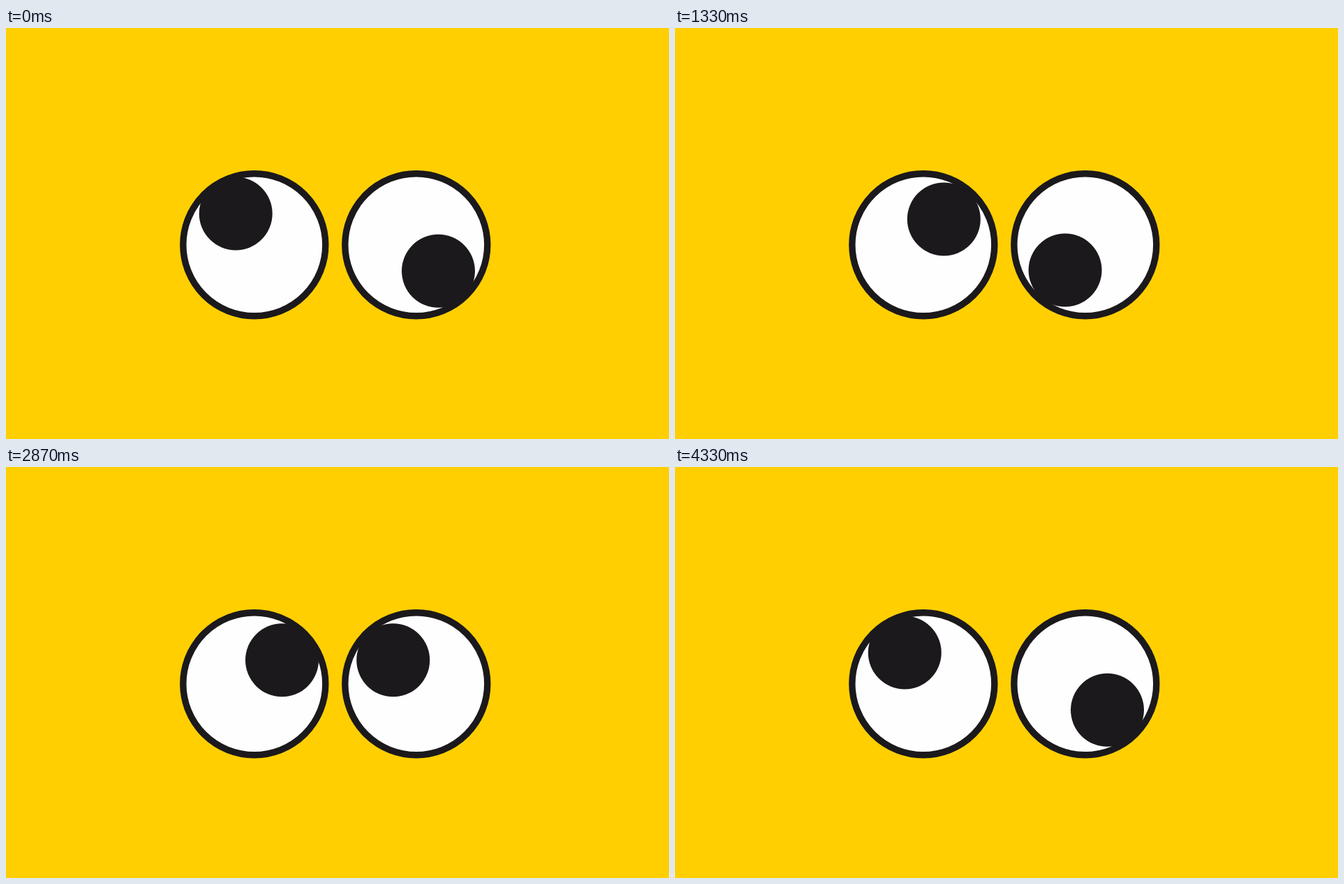
Write an HTML page that moves like this. It is 950 px wide and 589 px high and loops after 4400 ms.

```html
<!DOCTYPE html>
<html lang="en">
<head>
<meta charset="utf-8">
<title>Googly eyes</title>
<style>
  html, body { margin: 0; width: 100%; height: 100%; overflow: hidden; background: #ffcf02; }
  svg { display: block; width: 950px; height: 589px; }
  .eye { fill: #fefefe; stroke: #1b191c; stroke-width: 9.4; }
  .pupil { fill: #1b191c; }
</style>
</head>
<body>
<svg viewBox="0 0 950 589">
  <circle class="eye" cx="355.8" cy="310.8" r="102"/>
  <circle class="eye" cx="587.8" cy="310.8" r="102"/>
  <circle class="pupil" r="52.5"/>
  <circle class="pupil" r="52.5"/>
</svg>
<script>
  const LOOP = 4400, FRAME = 1000 / 15;
  const START = 387, STEP = 978, DURATION = 1000;

  // Each gaze: left pupil x, y, right pupil x, y
  const gazes = [
    [329.2, 266, 619.5, 348.3],
    [385.3, 274, 559, 347],
    [409, 311.3, 641.7, 310],
    [395.5, 276.8, 554.8, 276.8],
  ];
  const pupils = document.querySelectorAll('.pupil');

  const elasticOut = p =>
    p <= 0 ? 0 : p >= 1 ? 1 : 1 + 2 ** (-10 * p) * Math.sin((p - 0.075) * 2 * Math.PI / 0.3);

  function draw(time) {
    // Held at 15 pictures per second, rounded to the nearest 10 ms
    const t = Math.floor(((time + 5) % LOOP) / FRAME) * FRAME;
    const move = Math.max(0, Math.min(3, Math.floor((t - START) / STEP)));
    const k = elasticOut((t - START - move * STEP) / DURATION);
    const from = gazes[move], to = gazes[(move + 1) % gazes.length];
    const at = from.map((v, i) => v + (to[i] - v) * k);
    pupils.forEach((pupil, i) => {
      pupil.setAttribute('cx', at[2 * i]);
      pupil.setAttribute('cy', at[2 * i + 1]);
    });
  }

  const begin = performance.now();
  function tick() {
    draw(performance.now() - begin);
    requestAnimationFrame(tick);
  }
  tick();
</script>
</body>
</html>
```
